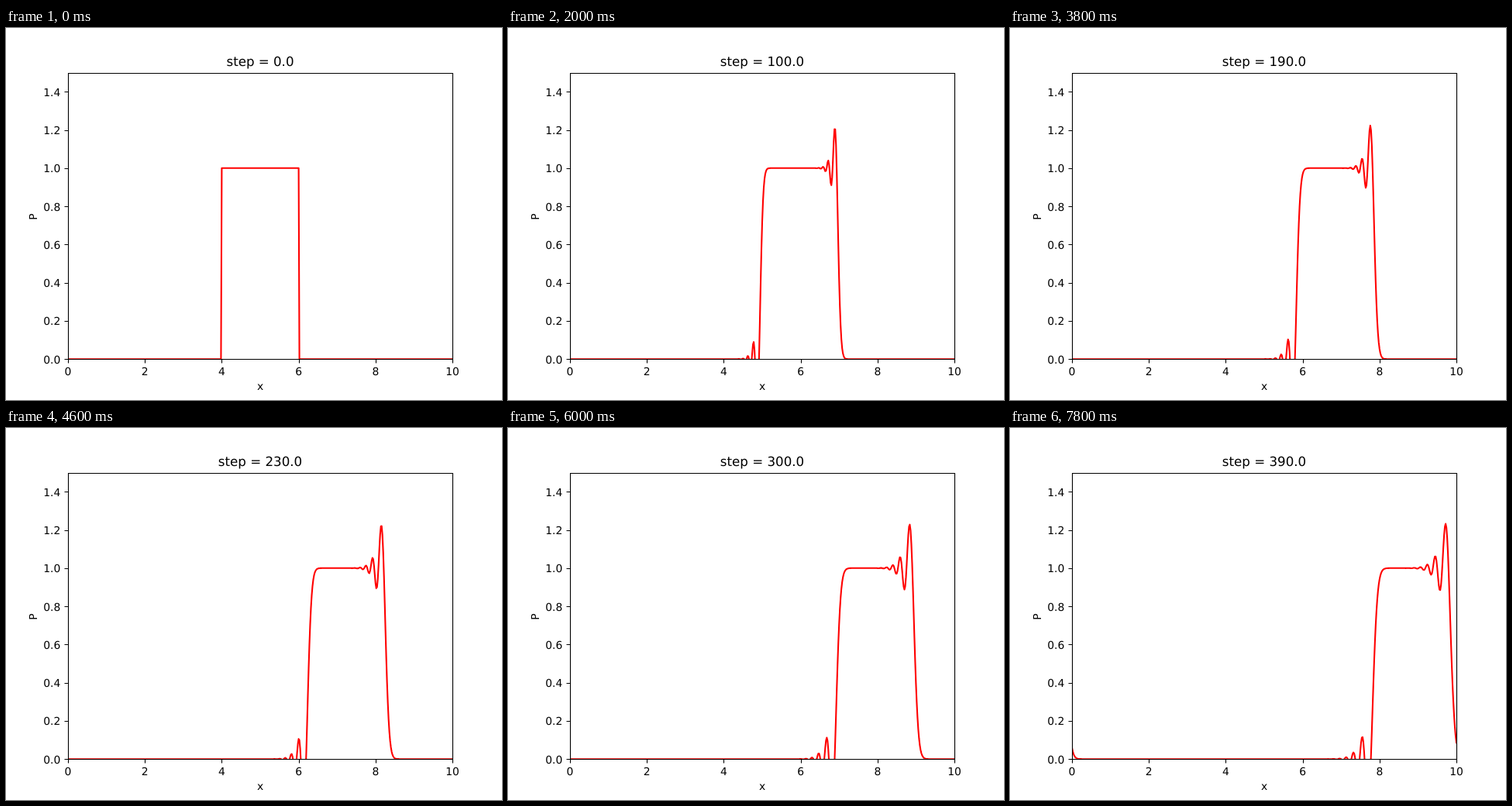
Recreate the animation shown at these times as an HTML page. Size 640x480 px, loop 8 s.

```html
<!DOCTYPE html>
<html lang="en">
<head>
<meta charset="utf-8">
<title>Advection of a square pulse</title>
<style>
  html, body { margin: 0; width: 100%; height: 100%; overflow: hidden; background: #fff; }
  svg { display: block; width: 100%; height: 100%; }
  text { font: 13.889px "DejaVu Sans", sans-serif; fill: #000; text-anchor: middle; text-rendering: geometricPrecision; }
  #title { font-size: 16.667px; }
  #yTicks text { text-anchor: end; }
  #axes { fill: none; stroke: #000; stroke-width: 1.11; }
  #curve { fill: none; stroke: #f00; stroke-width: 2.083; stroke-linejoin: round; stroke-linecap: square; }
</style>
</head>
<body>
<svg viewBox="0 0 640 480">
  <clipPath id="plot"><rect x="80" y="58" width="496" height="369"/></clipPath>
  <g clip-path="url(#plot)"><path id="curve"/></g>
  <path id="axes"/>
  <text id="title" x="328" y="49"></text>
  <g id="xTicks"></g>
  <g id="yTicks"></g>
  <text x="328" y="467">x</text>
  <text transform="translate(40 243.5) rotate(-90)">P</text>
</svg>
<script>
const FRAME_MS = 200, FRAMES = 40, STEPS_PER_FRAME = 10;
const CELLS = 501, DX = 0.02, COURANT = 0.5;

const $ = id => document.getElementById(id);
const toX = x => 80 + 49.6 * x;
const toY = p => 427.2 - 246.4 * p;

function addLabel(group, x, y, label) {
  const text = document.createElementNS(group.namespaceURI, "text");
  text.setAttribute("x", x);
  text.setAttribute("y", y);
  text.textContent = label;
  group.append(text);
}

function drawAxes() {
  let d = "M80.5 58.5H576.5V427.5H80.5Z";
  for (let x = 0; x <= 10; x += 2) {
    d += `M${Math.round(toX(x)) + 0.5} 427.5v5`;
    addLabel($("xTicks"), toX(x), 448, x);
  }
  for (let i = 0; i <= 7; i++) {
    const y = toY(i / 5);
    d += `M80.5 ${Math.round(y) + 0.5}h-5`;
    addLabel($("yTicks"), 70.3, Math.round(y + 5.5), (i / 5).toFixed(1));
  }
  $("axes").setAttribute("d", d);
}

// One Lax-Wendroff step on a periodic grid
function advance(u) {
  return u.map((p, i) => {
    const left = u[(i + CELLS - 1) % CELLS], right = u[(i + 1) % CELLS];
    return p - COURANT / 2 * (right - left) + COURANT ** 2 / 2 * (right - 2 * p + left);
  });
}

function buildCurves() {
  let u = Array.from({ length: CELLS }, (_, i) => (i >= 200 && i <= 300 ? 1 : 0));
  return Array.from({ length: FRAMES }, () => {
    const d = "M" + u.map((p, i) => `${toX(i * DX).toFixed(3)} ${toY(p).toFixed(3)}`).join("L");
    for (let s = 0; s < STEPS_PER_FRAME; s++) u = advance(u);
    return d;
  });
}

drawAxes();
const curves = buildCurves();
const start = performance.now();
let shown = -1;

function render() {
  const frame = Math.floor((performance.now() - start) / FRAME_MS) % FRAMES;
  if (frame !== shown) {
    shown = frame;
    $("curve").setAttribute("d", curves[frame]);
    $("title").textContent = `step = ${(frame * STEPS_PER_FRAME).toFixed(1)}`;
  }
  requestAnimationFrame(render);
}
render();
</script>
</body>
</html>
```
